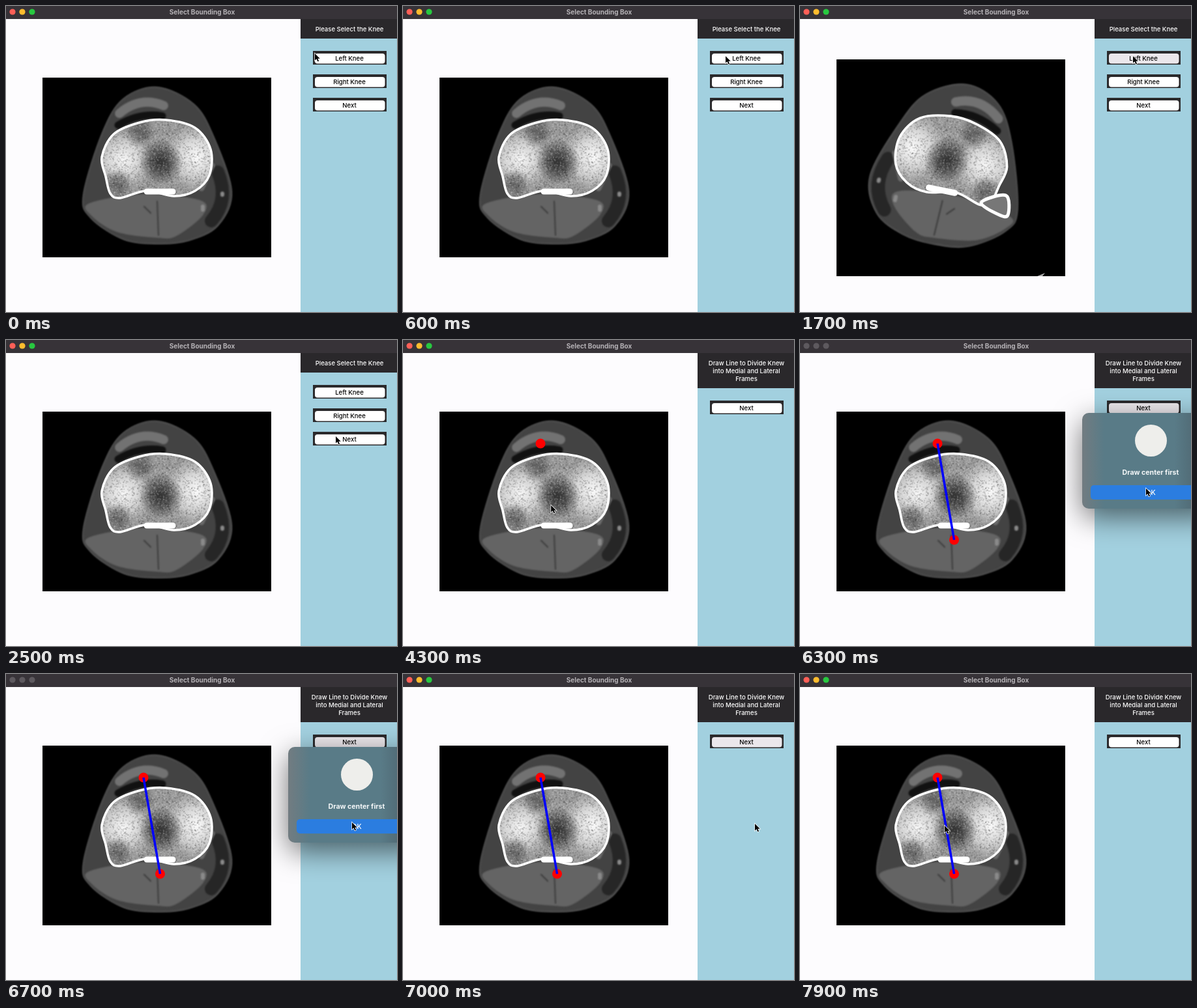
Write an HTML page with a canvas that moves like this. It is 600x470 px and loops after 8000 ms.

```html
<!DOCTYPE html>
<html lang="en">
<head>
<meta charset="utf-8">
<title>Select Bounding Box</title>
<style>
html, body { margin: 0; width: 100%; height: 100%; overflow: hidden; background: #fdfcfe; }
canvas { display: block; }
</style>
</head>
<body>
<canvas id="stage" width="600" height="470"></canvas>
<script>
const LOOP = 8000, STEP = 100;
const ctx = document.getElementById('stage').getContext('2d');

function rect(x, y, w, h, color, radius = 0) {
  ctx.fillStyle = color;
  ctx.beginPath();
  ctx.roundRect(x, y, w, h, radius);
  ctx.fill();
}

function dot(x, y, r, color) {
  ctx.fillStyle = color;
  ctx.beginPath();
  ctx.arc(x, y, r, 0, 7);
  ctx.fill();
}

function label(text, x, y, color, size = 9.55, weight = 500) {
  ctx.font = `${weight} ${size}px Inter, sans-serif`;
  ctx.textAlign = 'center';
  ctx.fillStyle = color;
  ctx.fillText(text, x, y);
}

// Closed smooth curve through x, y pairs.
function blob(...p) {
  const n = p.length / 2, path = new Path2D();
  const at = i => { const k = (i + n) % n * 2; return [p[k], p[k + 1]]; };
  path.moveTo(...at(0));
  for (let i = 0; i < n; i++) {
    const [a, b, c, d] = [i - 1, i, i + 1, i + 2].map(at);
    path.bezierCurveTo(b[0] + (c[0] - a[0]) / 6, b[1] + (c[1] - a[1]) / 6,
      c[0] - (d[0] - b[0]) / 6, c[1] - (d[1] - b[1]) / 6, ...c);
  }
  path.closePath();
  return path;
}

const skin = blob(232,125, 288,151, 318,200, 346,285, 325,337, 280,360, 232,365, 180,358, 130,325, 119,290, 148,195, 180,143);
const muscle = blob(128,303, 210,289, 297,298, 303,320, 262,353, 232,356, 170,347, 131,322);
const bone = blob(147,232, 165,197, 205,179, 245,175, 290,187, 314,220, 312,260, 290,284, 258,292, 215,284, 175,295, 160,288, 153,262);

function renderScan(top, bottom, isLeft) {
  const canvas = document.createElement('canvas');
  canvas.width = 600;
  canvas.height = 470;
  const g = canvas.getContext('2d');
  const fill = (path, color) => { g.fillStyle = color; g.fill(path); };
  const line = (path, color, width) => {
    g.strokeStyle = color;
    g.lineWidth = width;
    g.stroke(path);
  };
  const streak = (d, color, width) => line(new Path2D(d), color, width);
  const glow = (x, y, r, rgb) => {
    const light = g.createRadialGradient(x, y, 0, x, y, r);
    light.addColorStop(0, `rgba(${rgb},.95)`);
    light.addColorStop(.5, `rgba(${rgb},.6)`);
    light.addColorStop(1, `rgba(${rgb},0)`);
    g.fillStyle = light;
    g.fillRect(x - r, y - r, 2 * r, 2 * r);
  };
  g.lineCap = 'round';
  g.beginPath();
  g.rect(56, top, 351, bottom - top);
  g.clip();
  g.fillRect(56, top, 351, bottom - top);

  // The left knee is the right one mirrored and tilted.
  g.save();
  if (isLeft) {
    g.translate(231, 238);
    g.rotate(.2);
    g.scale(-1.02, 1.04);
    g.translate(-232, -240);
  }
  g.filter = 'blur(1.2px)';
  fill(skin, '#434343');
  line(skin, '#5a5a5a', 2);
  streak('M325 255Q343 298 315 330', '#262626', 20);
  streak('M300 280L316 245', '#6a6a6a', 9);
  fill(muscle, '#646464');
  streak('M174 165Q206 138 242 153', '#727272', 14);
  streak('M172 183Q206 163 240 169', '#111', 11);
  streak('M232 300L234 352M212 308L222 318', '#3c3c3c', 2);
  streak('M302 308V313M332 288V290', '#8a8a8a', 6);

  g.save();
  g.clip(bone);
  g.filter = 'none';
  fill(bone, '#9a9a9a');
  glow(292, 232, 50, '255,255,255');
  glow(180, 236, 46, '250,250,250');
  glow(238, 240, 34, '45,45,45');
  glow(206, 193, 24, '95,95,95');
  glow(172, 274, 24, '95,95,95');
  let seed = 11;
  const random = () => (seed = seed * 16807 % 2147483647) / 2147483647;
  for (let i = 0; i < 4000; i++) {
    g.fillStyle = i % 2 ? 'rgba(255,255,255,.13)' : 'rgba(0,0,0,.13)';
    g.fillRect(145 + random() * 175, 174 + random() * 122, 2, 2);
  }
  g.restore();

  g.filter = 'blur(.7px)';
  line(bone, '#fff', 3.5);
  streak('M216 285L256 285', '#fff', 9);
  g.restore();

  if (isLeft) {
    const fibula = blob(278,302, 316,291, 319,321, 304,320);
    fill(fibula, '#777');
    line(fibula, '#fff', 5);
    fill(new Path2D('M364 415L376 410L372 415Z'), '#aaa');
  }
  return canvas;
}

const rightScan = renderScan(110, 386, false);
const leftScan = renderScan(82, 415, true);

// Pointer moves: start and end time, destination.
const moves = [
  [100, 200, 495, 77], [600, 1200, 511, 77], [1700, 2000, 511, 112], [2100, 2500, 506, 148],
  [2600, 3000, 400, 190], [3000, 3500, 211, 158], [4000, 4500, 236, 306], [4900, 5600, 497, 103],
  [5900, 6300, 531, 228], [6700, 6900, 540, 230], [7100, 7800, 222, 233]
];

function pointerAt(t) {
  let x = 474, y = 73;
  for (const [from, to, toX, toY] of moves) {
    const u = Math.min(1, Math.max(0, (t - from) / (to - from)));
    const ease = u * u * (3 - 2 * u);
    x += (toX - x) * ease;
    y += (toY - y) * ease;
  }
  return [x, y];
}

const arrow = new Path2D('M0 0V12L2.8 9.4L4.9 14L7 13L4.9 8.8H8.8Z');

function drawPointer(x, y) {
  ctx.save();
  ctx.translate(x, y);
  ctx.scale(.88, .88);
  ctx.lineWidth = 1.6;
  ctx.strokeStyle = '#fff';
  ctx.stroke(arrow);
  ctx.fillStyle = '#000';
  ctx.fill(arrow);
  ctx.restore();
}

function drawButton(text, y, pressed) {
  rect(471, y, 113, 21, '#2b2a2c');
  rect(474, y + 4, 107.5, 15.5, pressed ? '#ebe7eb' : '#fff', 4);
  label(text, 527, y + 15, '#000');
}

function drawSidebar(t) {
  const dividing = t >= 2700;
  const during = (from, to) => t >= from && t < to;
  rect(452, 20, 148, 450, '#a2d0df');
  rect(452, 20, 148, dividing ? 54 : 30, '#2a282b');
  if (dividing) {
    ['Draw Line to Divide Knew', 'into Medial and Lateral', 'Frames']
      .forEach((text, i) => label(text, 527, 39 + i * 12, '#fff'));
    drawButton('Next', 93, during(5700, 7200));
  } else {
    label('Please Select the Knee', 527, 39, '#fff');
    drawButton('Left Knee', 69, during(700, 1800));
    drawButton('Right Knee', 105, during(2000, 2300));
    drawButton('Next', 141, during(2600, 2700));
  }
}

function drawMarks(t) {
  if (t >= 3700) dot(211, 159, 7.5, '#f00');
  if (t < 4900) return;
  dot(236.5, 307, 7.5, '#f00');
  ctx.strokeStyle = '#00f';
  ctx.lineWidth = 3.5;
  ctx.beginPath();
  ctx.moveTo(211, 159);
  ctx.lineTo(236.5, 307);
  ctx.stroke();
}

function drawDialog() {
  const glass = ctx.createLinearGradient(433, 0, 600, 0);
  glass.addColorStop(0, '#727c81');
  glass.addColorStop(.2, '#597b87');
  glass.addColorStop(.85, '#597b87');
  glass.addColorStop(1, '#526d78');
  ctx.save();
  ctx.shadowColor = 'rgba(0,0,0,.55)';
  ctx.shadowBlur = 44;
  ctx.shadowOffsetY = 13;
  rect(433, 112, 210, 147, glass, 10);
  ctx.restore();
  dot(538.5, 154.5, 24.5, '#eeeeeb');
  label('Draw center first', 538, 207, '#f4f7f8', 10.6, 700);
  rect(446, 223, 184, 22, '#2b7de0', 5);
  label('OK', 538, 237.5, '#fff', 10.5);
}

function draw(t) {
  const dialogOpen = t >= 5900 && t < 6800;
  rect(0, 0, 600, 470, '#fdfcfe');
  ctx.drawImage(t >= 900 && t < 2100 ? leftScan : rightScan, 0, 0);
  drawMarks(t);
  drawSidebar(t);
  rect(0, 0, 600, 20, '#373338');
  label('Select Bounding Box', 301, 12.5, '#b5b2b6', 10, 700);
  ['#fe5f57', '#febc2e', '#28c840']
    .forEach((color, i) => dot(10 + 15 * i, 9, 4.6, dialogOpen ? '#5d595e' : color));
  if (dialogOpen) drawDialog();
  drawPointer(...pointerAt(t));
}

const start = performance.now();
function frame() {
  const t = (performance.now() - start) % LOOP;
  draw(Math.floor(t / STEP) * STEP);
  requestAnimationFrame(frame);
}
frame();
</script>
</body>
</html>
```
